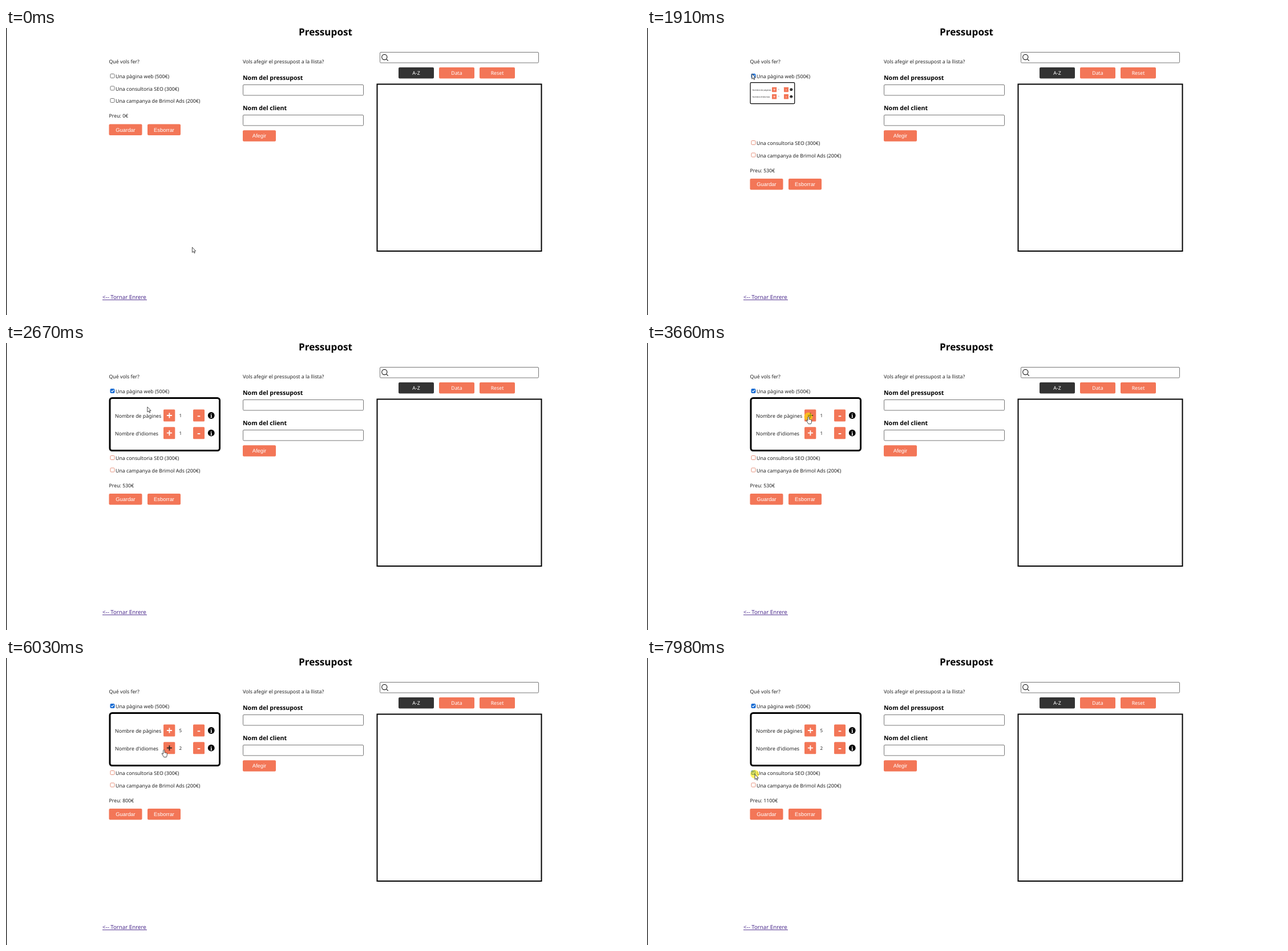
An HTML page that plays this animation: 1113x503 px, repeating every 8 s.

```html
<!DOCTYPE html>
<html lang="ca">
<head>
<meta charset="utf-8">
<title>Pressupost</title>
<style>
  html, body { margin: 0; height: 100%; overflow: hidden; background: #fff; }
  svg { display: block; width: 100%; height: 100%; text-rendering: geometricPrecision; }
  text { font: 8.75px "Noto Sans", "Open Sans", sans-serif; fill: #222; }
  .title { font-size: 17.1px; font-weight: 700; fill: #000; }
  .head { font-size: 10.6px; font-weight: 700; fill: #000; }
  .mid { text-anchor: middle; }
  .white { fill: #fff; }
  .arial { font: 9.4px "Liberation Sans", Arial, sans-serif; }
  .count { font-size: 8px; }
  .info { font: 700 10px "Noto Serif", serif; }
  .link { font-size: 9.7px; fill: #4b2a8c; }
  .field { fill: #fff; stroke: #767676; }
  .sign { fill: none; stroke: #fff; stroke-width: 1.8; }
  .hover { stroke: #222; }
  .tick { fill: none; stroke: #fff; stroke-width: 1.2; }
  .cursor { fill: #fff; stroke: #222; stroke-width: .8; stroke-linejoin: round; }
</style>
</head>
<body>
<svg id="stage" viewBox="0 0 1113 503"></svg>
<script>
const ORANGE = '#f37657';
const text = (x, y, s, cls = '', id = '') => `<text x="${x}" y="${y}" class="${cls}" id="${id}">${s}</text>`;
const button = (x, y, w, label, cls = '', fill = ORANGE) =>
  `<rect x="${x}" y="${y}" width="${w}" height="19.5" rx="2" fill="${fill}"/>` +
  text(x + w / 2, y + 13, label, 'mid white ' + cls);
const field = (x, y, w) => `<rect class="field" x="${x}" y="${y}" width="${w}" height="18.5" rx="1.5"/>`;
const option = (id, y, label) =>
  `<rect id="${id}" x="183" y="${y - 7.5}" width="7" height="7" rx="1.3"/>
   <path id="${id}Tick" class="tick" d="M184.4 ${y - 4}l1.6 1.7 2.9-3.5"/>` + text(192, y, label);
const counter = (id, y, label) =>
  text(191, y + 4, label) +
  `<rect x="276" y="${y - 10.5}" width="20.3" height="21" rx="1.5" fill="${ORANGE}"/>
   <path id="${id}Plus" class="sign" d="M281.9 ${y}h9M286.4 ${y - 4.5}v9"/>` +
  text(303.5, y + 3, 1, 'count', id) +
  `<rect x="328" y="${y - 10.5}" width="20" height="21" rx="1.5" fill="${ORANGE}"/>
   <path class="sign" d="M335.7 ${y + 1.3}h4.6"/>
   <circle cx="359.7" cy="${y}" r="5.9"/>` + text(359.7, y + 3.8, 'i', 'mid white info');

stage.innerHTML =
  '<rect width="1.2" height="503"/>' +
  text(560, 13, 'Pressupost', 'mid title') +
  text(180.5, 62, 'Qué vols fer?') +
  option('web', 88, 'Una pàgina web (500€)') +
  '<g id="lower">' +
    option('seo', 109.5, 'Una consultoria SEO (300€)') +
    option('ads', 131, 'Una campanya de Brimol Ads (200€)') +
    text(180.5, 157, '', '', 'price') +
    button(180.5, 168.5, 58, 'Guardar', 'arial') +
    button(248, 168.5, 58, 'Esborrar', 'arial') +
  '</g>' +
  '<path id="smudge" d="M185 182l6 6h-6z" fill="#776a66"/>' +
  `<g id="panel"><rect x="182" y="96.5" width="192.5" height="92" rx="4" fill="#fff" stroke="#000" stroke-width="3"/>` +
    counter('pages', 127, 'Nombre de pàgines') +
    counter('languages', 157.7, "Nombre d'idiomes") +
  '</g>' +
  text(415, 62, 'Vols afegir el pressupost a la llista?') +
  text(415, 90.5, 'Nom del pressupost', 'head') + field(415.5, 99.5, 211) +
  text(415, 143.5, 'Nom del client', 'head') + field(415.5, 152.5, 211) +
  button(415, 179.3, 58, 'Afegir', 'arial') +
  field(655.5, 42.5, 278) +
  `<g fill="none" stroke="#222" stroke-width="1.2"><circle cx="663.3" cy="51" r="4.6"/>
   <path d="M666.6 54.4l3.2 3.2"/></g>` +
  button(688, 69, 62, 'A-Z', '', '#333') +
  button(759, 69, 62, 'Data') +
  button(830, 69, 62, 'Reset') +
  '<rect x="650.5" y="98.5" width="288" height="292.5" fill="none" stroke="#000" stroke-width="2"/>' +
  text(169, 475, '&lt;-- Tornar Enrere', 'link') +
  '<path d="M169 476.5h78" stroke="#4b2a8c" stroke-width=".9"/>' +
  `<g id="pointer"><circle id="flash" r="7.5" fill="#ffe900" opacity=".6"/>
   <path id="arrow" class="cursor" d="M.4 .3V9.4L2.5 7.5 4 10.7 5.4 10 3.9 7H6.7Z"/>
   <path id="hand" class="cursor" d="M-1 .6V7L-2.5 5.8Q-3.6 5.6-3.4 6.6L-1 10.7Q-.5 12 .2 12.6H4.5Q5.6 10.6 5.7 9V5.8Q5.2 4.9 4.4 5.5 3.9 4.5 3 5.1 2.5 4.2 1.4 4.8V.6Q.2-1-1 .6Z"/></g>`;

const LOOP = 8000, OPEN = 1770, SHIFT = 95.5;
const route = [ // time, x, y
  [0, 326, 384], [70, 325, 382], [400, 272, 308], [820, 185, 183], [890, 179, 140],
  [1030, 175.5, 97.5], [1300, 183.5, 80], [2330, 183.5, 80], [2860, 282.8, 129.2],
  [4900, 282.8, 129.2], [5210, 283, 158], [5980, 283, 158], [6770, 184, 207],
  [6970, 188.7, 203.5], [LOOP, 188.7, 203.5]
];
const flashes = [[1570, 1700], [3660, 3730], [3930, 4000], [4200, 4270], [4540, 4680], [5500, 5550], [7170, 7240], [7980, LOOP]];
const pageClicks = [3730, 4000, 4270, 4680];

const el = id => document.getElementById(id);
const show = (id, on) => el(id).setAttribute('visibility', on ? 'visible' : 'hidden');

function pointerAt(t) {
  const i = route.findIndex(p => p[0] > t);
  const [t0, x0, y0] = route[i - 1], [t1, x1, y1] = route[i];
  const k = (t - t0) / (t1 - t0);
  return [x0 + (x1 - x0) * k, y0 + (y1 - y0) * k];
}

function setOption(id, on, border) {
  el(id).setAttribute('fill', on ? '#176bd2' : '#fff');
  el(id).setAttribute('stroke', on ? '#176bd2' : border);
  show(id + 'Tick', on);
}

function draw(t) {
  const open = t >= OPEN, seo = t >= 7240;
  const pages = 1 + pageClicks.filter(c => c <= t).length;
  const languages = t >= 5550 ? 2 : 1;
  const border = open ? '#e5917d' : '#767676';
  setOption('web', open, border);
  setOption('seo', seo, border);
  setOption('ads', false, border);
  el('pages').textContent = pages;
  el('languages').textContent = languages;
  const total = (open ? 500 + 30 * pages * languages : 0) + (seo ? 300 : 0);
  el('price').textContent = `Preu: ${total}€`;
  el('lower').setAttribute('transform', `translate(0 ${open ? SHIFT : 0})`);

  const p = Math.min(1, Math.max(0, (t - 1784) / 485));
  const scale = 1 - (1 - p) ** 1.7;
  el('panel').setAttribute('transform', `translate(180.5 95) scale(${scale}) translate(-180.5 -95)`);
  show('panel', p > 0);
  show('smudge', t >= 890 && !open);

  const [x, y] = pointerAt(t);
  const over = cy => open && x > 276 && x < 296.3 && Math.abs(y - cy) < 10.5;
  const onPages = over(127), onLanguages = over(157.7);
  el('pagesPlus').classList.toggle('hover', onPages);
  el('languagesPlus').classList.toggle('hover', onLanguages);
  el('pointer').setAttribute('transform', `translate(${x} ${y})`);
  show('hand', onPages || onLanguages);
  show('arrow', !onPages && !onLanguages);
  show('flash', flashes.some(([a, b]) => t >= a && t < b));
}

const start = performance.now();
function tick() {
  draw((performance.now() - start) % LOOP);
  requestAnimationFrame(tick);
}
tick();
</script>
</body>
</html>
```
